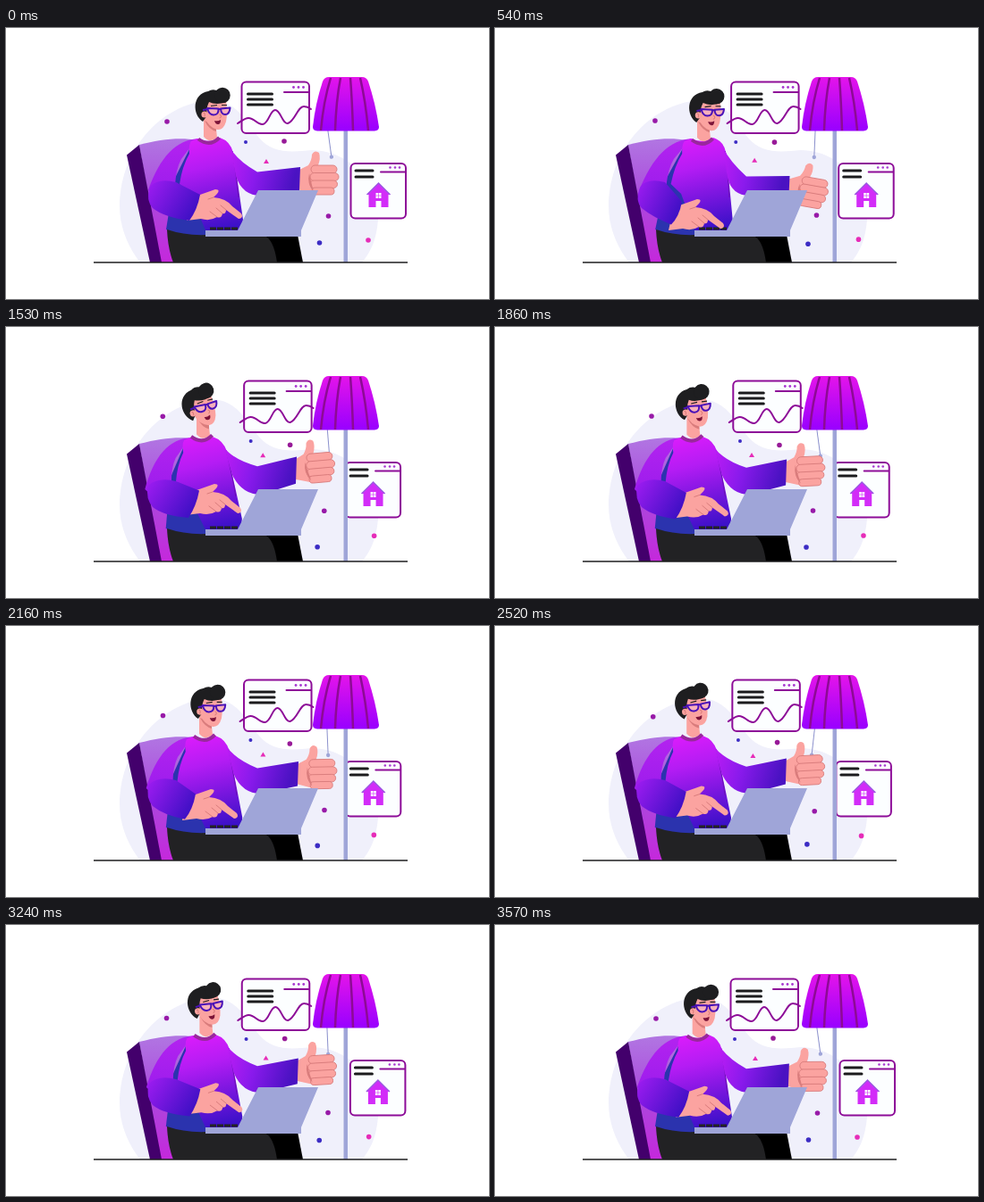
Recreate the animation shown at these times as an HTML page. Size 540 by 304 pixels, loop 3.6 s.

```html
<!DOCTYPE html>
<html lang="en">
<head>
<meta charset="utf-8">
<title>Working from the armchair</title>
<style>
html, body { margin: 0; width: 100%; height: 100%; overflow: hidden; background: #fff; }
svg { display: block; width: 540px; height: 304px; }
.skin { fill: #fba3a0; }
.crease { fill: none; stroke: #d97c7c; stroke-width: 1; stroke-linecap: round; }
.panel { fill: #fcfeff; stroke: #8d0c98; stroke-width: 2; }
.rule { fill: none; stroke: #8d0c98; stroke-width: 2; stroke-linecap: round; }
.bars { stroke: #1b1b1d; stroke-width: 3; stroke-linecap: round; }
.buttons { fill: #a838d0; }
</style>
</head>
<body>
<svg viewBox="0 0 540 304">
  <defs>
    <linearGradient id="shade" x2="0" y2="1"><stop stop-color="#e414ea"/><stop offset="1" stop-color="#9800ff"/></linearGradient>
    <linearGradient id="seat" x2="0" y2="1"><stop stop-color="#b176e2"/><stop offset=".5" stop-color="#ab48dc"/><stop offset="1" stop-color="#c528dc"/></linearGradient>
    <linearGradient id="shirt" x2=".15" y2="1"><stop stop-color="#e01cfc"/><stop offset=".35" stop-color="#b41cf4"/><stop offset="1" stop-color="#3c10c8"/></linearGradient>
    <linearGradient id="upper" x2="0" y2="1"><stop stop-color="#b423f0"/><stop offset="1" stop-color="#9a1cec"/></linearGradient>
    <linearGradient id="fore" x2="1" y2=".5"><stop stop-color="#a01cf2"/><stop offset="1" stop-color="#4210c6"/></linearGradient>
    <linearGradient id="sleeve" x2="1" y2=".2"><stop stop-color="#bd1cf5"/><stop offset=".45" stop-color="#8a1aec"/><stop offset="1" stop-color="#4a12c2"/></linearGradient>
  </defs>

  <path fill="#f0f0fb" d="M150 263C138 248 127 225 127 200C128 130 180 83 230 81C258 82 268 104 282 122C298 142 320 139 342 137C390 138 416 180 416 215C414 238 408 251 398 263Z"/>
  <g id="specks"></g>

  <g id="chart">
    <rect class="panel" x="263.5" y="60.5" width="75.5" height="57.5" rx="5"/>
    <path class="bars" d="M270.500 74H297.500M270.500 80H297.500M270.500 86H297.500"/>
    <path class="rule" d="M311 72H338"/>
    <g class="buttons"><circle cx="321.500" cy="66.500" r="1.400"/><circle cx="327" cy="66.500" r="1.400"/><circle cx="332.500" cy="66.500" r="1.400"/></g>
    <path class="rule" d="M259 107C264 104 267 101 271 101C278 101 281 109 287 108C294 107 295 92 301 92C307 92 309 108 315 107C323 105 326 88 333 88Q337 88 341 91"/>
  </g>

  <g id="home">
    <rect class="panel" x="385.500" y="152" width="61.500" height="61.500" rx="5"/>
    <path class="bars" d="M391 160H410M391 167H410"/>
    <path class="rule" d="M419 161.500H446"/>
    <g class="buttons"><circle cx="429.500" cy="156.500" r="1.300"/><circle cx="435" cy="156.500" r="1.300"/><circle cx="440" cy="156.500" r="1.300"/></g>
    <path fill="#d22cf8" d="M403.500 187L416.500 174L429.500 187H427.500V201H405.500V187Z"/>
    <path fill="none" stroke="#9a5ae0" stroke-width="1.500" d="M403.500 187L416.500 174L429.500 187"/>
    <path fill="#fcfeff" d="M413.500 185h6v6h-6zM413.500 194h6v7h-6z"/>
    <path stroke="#d22cf8" stroke-width=".6" d="M416.500 185v6M413.500 188h6"/>
  </g>

  <g id="cord">
    <path stroke="#8b90cc" d="M358.500 105V145"/>
    <circle cx="358.500" cy="145" r="2.200" fill="#9fa5d8"/>
  </g>
  <path fill="#9fa5d8" d="M377.500 114h4.500v149h-4.500z"/>
  <path fill="url(#shade)" d="M361 55H398Q403 55 405 60Q413 84 417 111Q417 115 412 115.500H348Q343 115 343 111Q346 84 354 60Q356 55 361 55Z"/>
  <path fill="none" stroke="#8d0a94" stroke-width="2.500" d="M363 56Q355 82 352 115M374 56Q369 82 368 115M385 56Q387 82 388 115M396 56Q402 82 405 115"/>

  <path fill="url(#seat)" d="M149 131C172 125 195 122 214 126L222 200L188 263H172Z"/>
  <path fill="#43006c" d="M135 142.500L149 131L174 263H161Z"/>

  <g id="torso">
    <path fill="#2b33ae" d="M206 134L188 170L179 226Q200 235 232 234V150Z"/>
    <path fill="url(#upper)" d="M216 124C190 125 172 145 159 182Q175 200 189 176Q190 158 196 147L206 134Z"/>
    <path fill="url(#shirt)" d="M214 124Q227 130 239 123Q251 127 254 140L260 180L265 215L262 234H226L206 186L194 175Q197 155 205 141Q204 131 207 127Z"/>
    <path fill="none" stroke="#6a12b4" d="M253 138Q257 160 260 190"/>
  </g>
  <g id="thumb">
    <path class="skin" d="M326 160L338 154Q342 148 342 142Q345 136 350 140Q352 146 349 154L360 156V186L344 186L326 181Z"/>
    <g class="skin" stroke="#d97c7c" stroke-width=".9">
      <rect x="341" y="154" width="29" height="9" rx="4.500"/>
      <rect x="340" y="162.500" width="32" height="9" rx="4.500"/>
      <rect x="340" y="171" width="30.500" height="8.500" rx="4.200"/>
      <rect x="342" y="179" width="25" height="8" rx="4"/>
    </g>
    <path fill="#d97c7c" d="M339 163Q336 175 344 184L341 172Z"/>
  </g>
  <path id="farArm" fill="url(#sleeve)"/>

  <g id="neck">
    <path class="skin" d="M221 100V122Q228 130 236 123L234 104Z"/>
    <path fill="#d97c7c" d="M222 104Q227 114 235 116V110Z"/>
    <path fill="none" stroke="#99289c" stroke-width="4" d="M215 124.500Q228 134 238.500 123"/>
  </g>
  <g id="head">
    <path class="skin" d="M222 83L246 81Q248 95 246 105Q243 115 236 114Q226 111 223 101Z"/>
    <path fill="#1e1e20" d="M220 105C208 97 208 74 226 71Q232 67 240 72L246 83Q235 87 227 83Q223 91 225 98Z"/>
    <circle cx="242" cy="75.500" r="8.700" fill="#1e1e20"/>
    <circle class="skin" cx="222" cy="97" r="3.600"/>
    <path class="crease" d="M221 95q2 1 1 4M239 97q3 2 0 4"/>
    <path fill="#7c1438" d="M233 104q4 1 7 -1q0 5 -3 5q-3 0 -4 -4z"/>
    <g fill="#f7b0bc" stroke="#4a12b8" stroke-width="2" stroke-linejoin="round">
      <path d="M225 90L237.500 90.500Q238 97.500 232 97.500Q227 97.500 225 90Z"/>
      <path d="M240 90.500L250.500 89.500Q250 97 245 97Q240.500 97 240 90.500Z"/>
      <path d="M220 92L226 91M237 91H241"/>
    </g>
    <path stroke="#1e1e20" stroke-width="1.200" d="M229 87.500l7 -1M241 86.500l6 0"/>
  </g>

  <path fill="#000" d="M285 232H326L332 263H296Z"/>
  <path fill="#222224" d="M180 226Q200 233 224 232H286Q299 234 303 263H187Q181 248 180 226Z"/>
  <path fill="#9fa5d8" d="M282 182H349L330 227V234H223V227H259Z"/>
  <path fill="none" stroke="#222224" stroke-width="3" stroke-dasharray="7 1" d="M228 225H260"/>

  <g id="typing">
    <path class="skin" d="M208 190L217 187L234 181Q240 181 236 186L232 190Q246 191 253 200L263 208Q266 213 260 214L246 204Q246 209 242 208Q241 214 236 212Q228 217 218 214L202 216Z"/>
    <path class="crease" d="M246 204L240 199M242 208L235 202M236 212L228 206M232 190L226 192"/>
  </g>
  <path id="nearArm" fill="url(#fore)"/>
  <path stroke="#1c1c1e" stroke-width="1.300" d="M98 263H449"/>
</svg>
<script>
const LOOP = 3600;
const el = id => document.getElementById(id);
const place = (id, value) => el(id).setAttribute('transform', value);

// time, lean, head tilt, thumb hand x / y / turn, typing hand x / y
const poses = [
  [0, 0, 0, 0, 0, 0, 0, 0],
  [540, 5, 1, 0.5, 10, 10, -8, 11],
  [990, -1, -9.5, -2.5, 3, 1, -5, 7],
  [1530, -8, -13.5, -4, -10.5, -5, -1, -5],
  [2160, -5, -0.5, -2, -4, -1, -5, 2],
  [2880, -8, -13.5, -4, -10.5, -5, -1, -5]
];

// x, y, drift x, drift y, colour
const specks = [
  [180, 105, -5, -5, '#981aa8'],
  [268, 128, 6, 0, '#3c2cc4'],
  [311, 127, 7, 5.5, '#981a98'],
  [291, 150, -4, -6, '#e62cb8'],
  [360.500, 211, -5, -5, '#981aa8'],
  [350.500, 241, -2.500, 6, '#3c2cc4'],
  [405, 238, 7, -4, '#e62cb8']
];
el('specks').innerHTML = specks.map(([x, y, , , color], i) => i === 3
  ? `<path fill="${color}" d="M${x} ${y - 3}l3 5h-6z"/>`
  : `<circle cx="${x}" cy="${y}" r="${i === 1 ? 2 : 2.8}" fill="${color}"/>`).join('');

function poseKey(i) {
  const n = poses.length, turn = Math.floor(i / n), key = poses[i - turn * n];
  return [key[0] + turn * LOOP, ...key.slice(1)];
}

// Smooth cyclic curve through the poses
function poseAt(t) {
  const i = poses.filter(p => p[0] <= t).length - 1;
  const [a, b, c, d] = [-1, 0, 1, 2].map(k => poseKey(i + k));
  const span = c[0] - b[0], u = (t - b[0]) / span;
  return b.slice(1).map((from, k) => {
    const j = k + 1;
    const m0 = (c[j] - a[j]) / (c[0] - a[0]) * span;
    const m1 = (d[j] - b[j]) / (d[0] - b[0]) * span;
    const gap = c[j] - from;
    return from + u * (m0 + u * (3 * gap - 2 * m0 - m1 + u * (m0 + m1 - 2 * gap)));
  });
}

function draw(now) {
  const t = now % LOOP;
  const drift = (1 - Math.cos(2 * Math.PI * t / LOOP)) / 2;
  place('chart', `translate(${2.8 * drift})`);
  place('home', `translate(${-6.3 * drift})`);
  [...el('specks').children].forEach((node, i) =>
    node.setAttribute('transform', `translate(${specks[i][2] * drift} ${specks[i][3] * drift})`));
  place('cord', `rotate(${-7.8 * Math.cos(4 * Math.PI * t / LOOP)} 358.5 105)`);

  const [lean, tilt, hx, hy, turn, kx, ky] = poseAt(t);
  const shift = `translate(${lean} ${lean * 0.2})`;
  place('torso', `matrix(1 0 ${-lean / 105} 1 ${lean * 230 / 105} 0)`);
  place('neck', shift);
  place('head', `${shift} rotate(${tilt} 226 118)`);
  place('thumb', `translate(${hx} ${hy}) rotate(${turn} 330 170)`);
  place('typing', `translate(${kx} ${ky})`);

  const elbow = 161.5 + hy * 0.5;
  el('farArm').setAttribute('d', `M${251 + lean * 0.9} 135Q${259 + lean * 0.6} 149 281 ${elbow}
    L${329 + hx} ${156 + hy}L${328 + hx} ${182 + hy * 0.6}L285 188Q264 188 ${257 + lean * 0.5} 166Z`);
  el('nearArm').setAttribute('d', `M${161 + lean * 0.3} 178Q170 168 190 173L${217 + kx} ${187 + ky * 0.7}
    Q${214 + kx} ${204 + ky * 0.7} ${205 + kx} ${216 + ky * 0.4}Q176 212 164 202Q156 193 ${161 + lean * 0.3} 178Z`);
}

function frame() {
  draw(performance.now());
  requestAnimationFrame(frame);
}
frame();
</script>
</body>
</html>
```
